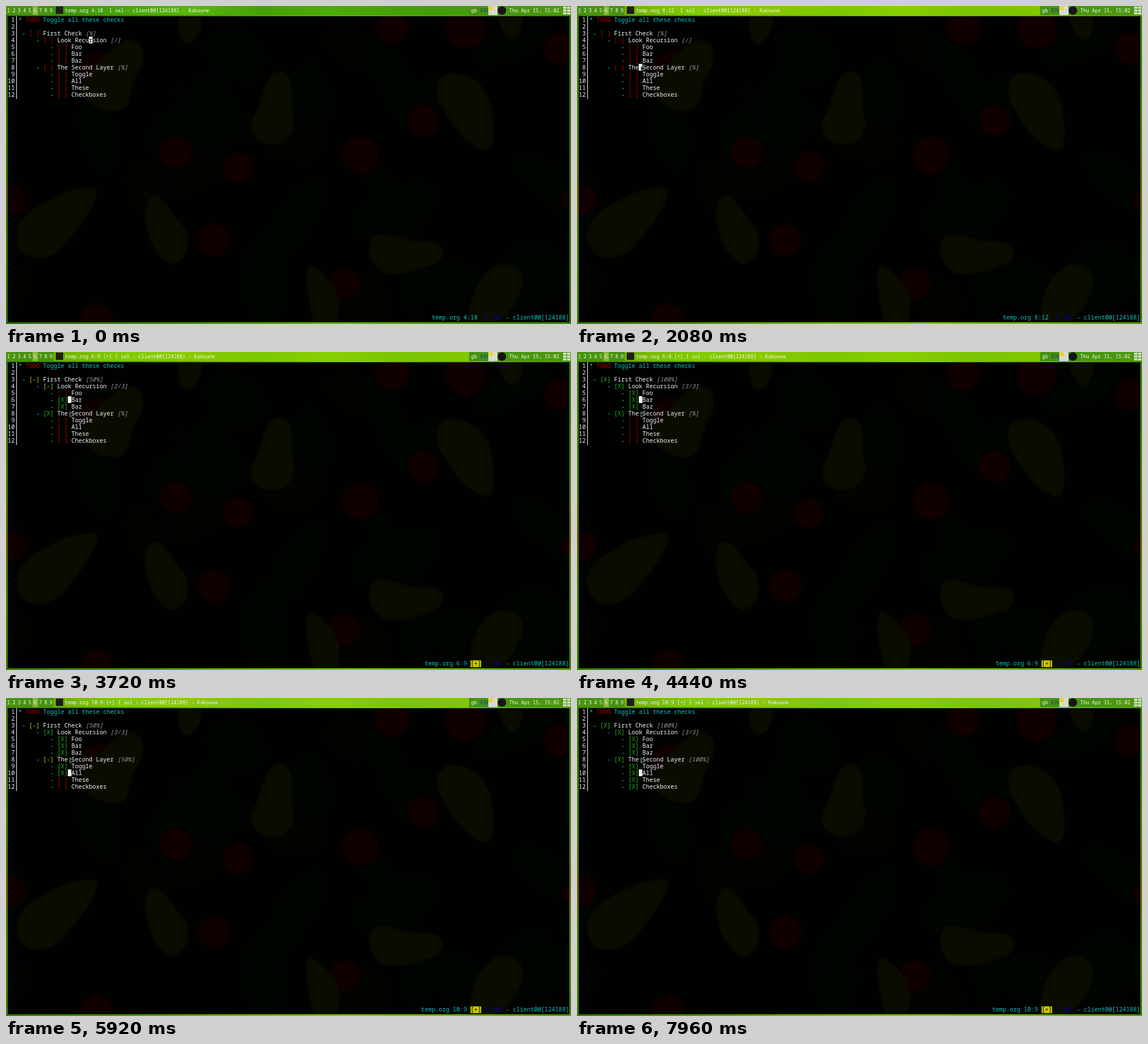
Recreate the animation shown at these times as an HTML page with a canvas. Size 998 by 561 pixels, loop 8000 ms.

```html
<!DOCTYPE html>
<html lang="en">
<head>
<meta charset="utf-8">
<title>Toggle all these checks</title>
<style>
  html, body { margin: 0; width: 100%; height: 100%; overflow: hidden; background: #000; }
  canvas { display: block; width: 998px; height: 561px; }
</style>
</head>
<body>
<canvas id="stage" width="998" height="561"></canvas>
<script>
const W = 998, H = 561, LOOP = 8000;
const CELL = 6.23, ROW = 12, TEXT_X = 22;
const FONT = '"Noto Sans Mono", "DejaVu Sans Mono", monospace';
const CYAN = '#10c4c4', WHITE = '#f4f4f4', RED = '#b00000', GREEN = '#22b822', YELLOW = '#c4c422', BLUE = '#0000b4';
const ctx = document.getElementById('stage').getContext('2d');

// Each step: time, kind, line. "go" moves the selection, "check" ticks a box.
const STEPS = [
  [1720, 'go', 8], [2360, 'check', 8],
  [2680, 'go', 7], [2960, 'check', 7],
  [3240, 'go', 6], [3480, 'check', 6],
  [3880, 'go', 5], [4120, 'check', 5],
  [4440, 'go', 6], [4560, 'go', 7], [4680, 'go', 8], [4800, 'go', 9],
  [5200, 'check', 9], [5480, 'go', 10], [5720, 'check', 10],
  [6000, 'go', 11], [6280, 'check', 11], [6640, 'go', 12],
  [7120, 'check', 12], [7640, 'go', 11], [7840, 'go', 10]
];
const POINTER = [[880, 82, 230], [1040, 94, 195], [1640, 113, 105]];
const FOCUS_START = 760, FOCUS_FADE = 200;

const LEAVES = { 5: 'Foo', 6: 'Bar', 7: 'Baz', 9: 'Toggle', 10: 'All', 11: 'These', 12: 'Checkboxes' };

const BERRIES = [
  [300, 258, 28], [410, 284, 27], [626, 263, 33], [738, 202, 28], [682, 38, 30], [812, 40, 36], [978, 75, 28],
  [368, 413, 29], [598, 490, 28], [8, 342, 27], [165, 112, 32], [160, 552, 28], [998, 345, 17]
];
const PEARS = [
  'M160 322C165 350 120 400 100 425C70 455 20 450 18 410C16 370 60 350 90 335C120 320 155 318 160 322',
  'M262 335C280 335 295 370 315 390C330 420 318 450 295 455C265 450 245 400 246 365C248 345 255 335 262 335',
  'M482 115C505 115 508 150 505 180C515 215 505 243 470 244C435 243 425 215 440 190C455 165 455 118 482 115',
  'M790 118C830 120 858 150 860 200C862 235 862 255 845 255C815 245 790 215 775 185C755 155 755 120 790 118',
  'M650 405C680 395 700 420 745 415C775 415 780 440 760 455C720 465 700 480 665 470C640 455 635 420 650 405',
  'M870 456C905 452 920 475 910 500C895 540 880 555 850 561H815C820 520 830 470 870 456',
  'M535 458C555 460 580 490 590 520L585 561H545C535 530 525 480 535 458',
  'M215 60C245 60 248 90 235 115C215 140 225 175 200 185C160 190 130 160 130 140C150 120 180 70 215 60',
  'M305 18H347C345 50 330 68 318 66C305 62 303 40 305 18',
  'M868 18H912C914 40 905 58 896 60C882 56 872 38 868 18'
];

// Window decoration, with and without keyboard focus
const UNFOCUSED = {
  title: ['#3c9408', '#48a40a', '#58b80c', '#44a008', '#4cac08', '#44a008', '#449a10'],
  top: ['#2c6c00', '#388400', '#48a000', '#58b800', '#48a000', '#388400'],
  side: ['#2c7000', '#347800', '#4a6800', '#347800', '#2c7000']
};
const FOCUSED = {
  title: ['#72b000', '#80cc00', '#8cc800', '#7cc800', '#88d000', '#7ac400', '#82c600'],
  top: ['#3c7c04', '#4c9408', '#70b400', '#80c800', '#70b800', '#559408'],
  side: ['#3c8004', '#4a8808', '#6a6a00', '#4a8808', '#3c8004']
};

function box(c, x, y, w, h, fill) {
  c.fillStyle = fill;
  c.fillRect(x, y, w, h);
}

function disc(c, x, y, r, fill) {
  c.fillStyle = fill;
  c.beginPath();
  c.arc(x, y, r, 0, 2 * Math.PI);
  c.fill();
}

function write(c, text, x, y, color, size = 10.38, style = '') {
  c.font = `${style} 500 ${size}px ${FONT}`;
  c.fillStyle = color;
  c.fillText(text, x, y);
}

function blend(c, x0, y0, x1, y1, colors) {
  const g = c.createLinearGradient(x0, y0, x1, y1);
  colors.forEach((color, i) => g.addColorStop(i / (colors.length - 1), color));
  return g;
}

const baseline = line => 27.6 + (line - 1) * ROW;

function drawWallpaper(c) {
  box(c, 0, 0, W, H, '#000200');
  let seed = 7;
  const random = () => (seed = seed * 16807 % 2147483647) / 2147483647;
  c.filter = 'blur(9px)';
  for (let i = 0; i < 26; i++) {
    c.fillStyle = i % 3 ? '#000500' : '#020400';
    c.beginPath();
    c.ellipse(random() * W, random() * H, 50 + random() * 50, 22 + random() * 20, random() * 3, 0, 7);
    c.fill();
  }
  c.filter = 'blur(2px)';
  BERRIES.forEach(([x, y, r]) => disc(c, x, y, r, '#100000'));
  c.fillStyle = '#0b0c00';
  PEARS.forEach(d => c.fill(new Path2D(d)));
  c.filter = 'none';
}

function drawFrame(c, theme) {
  const side = blend(c, 0, 90, 0, H, theme.side);
  const edge = blend(c, 0, 0, W, 0, theme.top);
  box(c, 0, 16, W, 2, edge);
  box(c, 0, 18, 3, H - 18, side);
  box(c, W - 3, 18, 3, H - 18, side);
  box(c, 0, H - 3, W, 3, edge);
}

function drawBar(c, theme) {
  box(c, 0, 0, W, 16, blend(c, 0, 0, W, 0, ['#4a9410', '#3f9010', '#46960e', '#429010', '#4c9a10']));
  box(c, 47, 0, 9.4, 16, '#86b83c');
  box(c, 84, 0, 734, 16, blend(c, 84, 0, 818, 0, theme.title));
  for (let tag = 1; tag <= 9; tag++) write(c, tag, 2 + (tag - 1) * 9.38, 11, WHITE, 8.67);
  box(c, 88, 1, 13, 13, '#201c20');
  write(c, 'gb', 821.5, 11, WHITE, 8.67);
  c.font = '10px "Liberation Serif", serif';
  c.fillStyle = '#183878';
  c.fillText('EN', 838, 10.5);
  box(c, 852, 0, 16, 16, '#d8dcd0');
  disc(c, 856.5, 4, 4, '#f0d040');
  disc(c, 876, 8, 7.5, '#181418');
  write(c, 'Thu Apr 15, 15:02', 889, 11, WHITE, 8.67);
  for (let i = 0; i < 6; i++) box(c, 984 + i % 2 * 7, 1 + (i >> 1) * 5, 6, 4, '#d0dcc0');
}

function drawGutter(c) {
  for (let line = 1; line <= 12; line++) write(c, String(line).padStart(2), 3, baseline(line), WHITE);
  for (let line = 13; line <= 44; line++) write(c, '~', 3, baseline(line), BLUE);
  box(c, 18, 18, 1.2, 146, '#e0e0e0');
}

function makeBackdrop(theme) {
  const canvas = document.createElement('canvas');
  canvas.width = W;
  canvas.height = H;
  const c = canvas.getContext('2d');
  drawWallpaper(c);
  drawFrame(c, theme);
  drawBar(c, theme);
  drawGutter(c);
  return canvas;
}

function stateAt(t) {
  const state = { line: 4, checked: new Set() };
  for (const [time, kind, line] of STEPS) {
    if (time > t) break;
    if (kind === 'go') state.line = line;
    else state.checked.add(line);
  }
  return state;
}

const markFor = (done, total) => done === total ? 'X' : done ? '-' : ' ';

function drawItem(line, depth, mark, label, counter) {
  const y = baseline(line), col = 1 + depth * 4;
  const at = n => TEXT_X + (col + n) * CELL;
  write(ctx, '-', at(0), y, CYAN);
  write(ctx, `[${mark}]`, at(2), y, { X: GREEN, '-': YELLOW, ' ': RED }[mark]);
  write(ctx, label, at(6), y, WHITE);
  if (counter) write(ctx, `[${counter}]`, at(7 + label.length), y, '#989898', 10.38, 'italic');
}

function drawBuffer(checked) {
  const count = lines => lines.filter(n => checked.has(n)).length;
  const look = count([5, 6, 7]), second = count([9, 10, 11, 12]);
  const lookMark = markFor(look, 3);
  const secondMark = second ? markFor(second, 4) : checked.has(8) ? 'X' : ' ';
  const done = (lookMark === 'X') + (secondMark === 'X');
  const firstMark = done === 2 ? 'X' : checked.size ? '-' : ' ';

  write(ctx, '*', TEXT_X, baseline(1), CYAN);
  write(ctx, 'TODO', TEXT_X + 2 * CELL, baseline(1), RED);
  write(ctx, 'Toggle all these checks', TEXT_X + 7 * CELL, baseline(1), CYAN);
  drawItem(3, 0, firstMark, 'First Check', (checked.size ? done * 50 : '') + '%');
  drawItem(4, 1, lookMark, 'Look Recursion', look ? look + '/3' : '/');
  drawItem(8, 1, secondMark, 'The Second Layer', (second ? second * 25 : '') + '%');
  for (const n in LEAVES) drawItem(+n, 2, checked.has(+n) ? 'X' : ' ', LEAVES[n]);
}

function drawSelection(line) {
  const x = TEXT_X + (line === 4 ? 20 : 14) * CELL;
  box(ctx, x, 18 + (line - 1) * ROW, CELL, ROW, WHITE);
  if (line === 4) write(ctx, 'r', x, baseline(4), '#000');
}

function drawStatus(line, modified) {
  const column = { 4: 18, 8: 12 }[line] || 9;
  const head = `temp.org ${line}:${column} `, flag = modified ? '[+]' : '';
  const tail = '- client0@[124188]';
  write(ctx, `${head}${flag} 1 sel ${tail} - Kakoune`, 104, 11, WHITE, 8.67);

  const y = 553.3;
  let x = 995 - (head + flag + ' 1 sel ' + tail).length * CELL;
  const put = (text, color) => {
    write(ctx, text, x, y, color);
    x += text.length * CELL;
  };
  put(head, CYAN);
  if (flag) box(ctx, x, 544, 3 * CELL, ROW, '#c8c800');
  put(flag, '#000');
  put(' 1 sel ', BLUE);
  put(tail, CYAN);
}

function drawPointer(t) {
  if (t < POINTER[0][0]) return;
  let [, x, y] = POINTER[POINTER.length - 1];
  for (let i = 1; i < POINTER.length; i++) {
    const [t0, x0, y0] = POINTER[i - 1], [t1, x1, y1] = POINTER[i];
    if (t >= t1) continue;
    const p = (t - t0) / (t1 - t0), ease = p * p * (3 - 2 * p);
    x = x0 + (x1 - x0) * ease;
    y = y0 + (y1 - y0) * ease;
    break;
  }
  ctx.save();
  ctx.translate(x, y);
  const arrow = new Path2D('M0 .5V9.5L2.3 8L5.3 7.5V5.5Z');
  ctx.fillStyle = '#101010';
  ctx.strokeStyle = '#c0c0c0';
  ctx.lineWidth = 0.9;
  ctx.fill(arrow);
  ctx.stroke(arrow);
  ctx.restore();
}

const unfocused = makeBackdrop(UNFOCUSED);
const focused = makeBackdrop(FOCUSED);
const start = performance.now();

function render() {
  const t = (performance.now() - start) % LOOP;
  const { line, checked } = stateAt(t);
  ctx.drawImage(unfocused, 0, 0);
  ctx.globalAlpha = Math.min(1, Math.max(0, (t - FOCUS_START) / FOCUS_FADE));
  ctx.drawImage(focused, 0, 0);
  ctx.globalAlpha = 1;
  drawBuffer(checked);
  drawSelection(line);
  drawStatus(line, checked.size > 0);
  drawPointer(t);
  requestAnimationFrame(render);
}
render();
</script>
</body>
</html>
```
